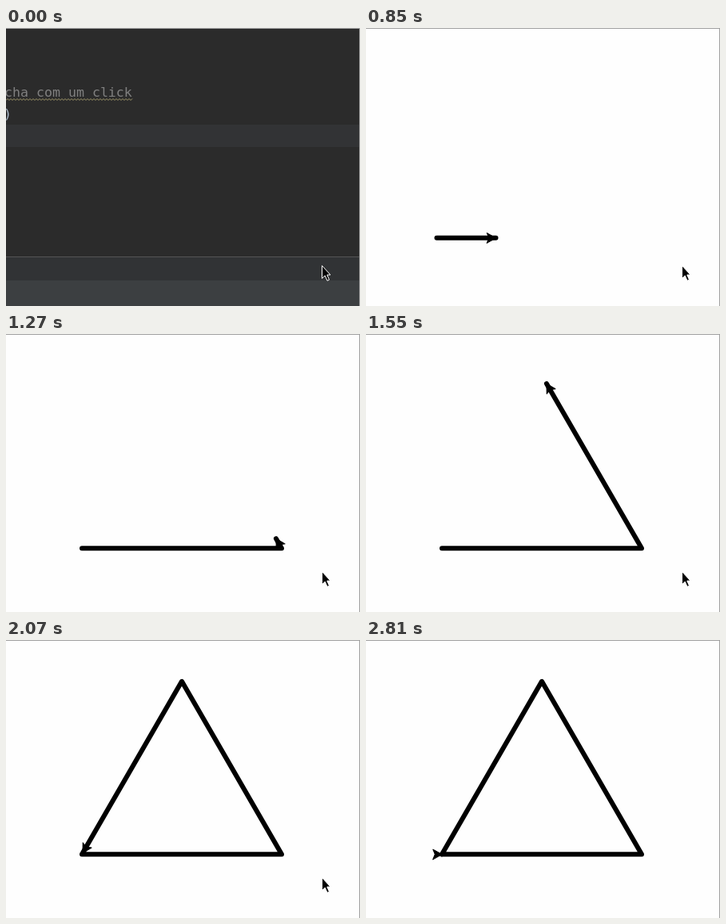
Recreate the animation shown at these times as an HTML page with a canvas. Size 443 px wide and 348 px high, loop 2960 ms.

```html
<!DOCTYPE html>
<html lang="pt">
<head>
<meta charset="utf-8">
<title>Triangle</title>
<style>
html, body { margin: 0; width: 100%; height: 100%; overflow: hidden; background: #2b2b2b; }
canvas { display: block; }
</style>
</head>
<body>
<canvas id="stage" width="443" height="348"></canvas>
<script>
const ctx = document.getElementById("stage").getContext("2d");
const LOOP = 2960, SIDE = 250, START = [95, 268.3];

// time, distance walked, heading in degrees
const WALK = [
  [850, 74, 0], [1000, 194, 0], [1130, 250, 66],
  [1270, 264, 120], [1400, 368, 120], [1550, 488, 120], [1670, 500, 140],
  [1810, 500, 238], [1950, 612, 240], [2070, 748, 240],
  [2210, 750, 310], [2330, 750, 360]
];

// time, pointer kind, x, y
const POINTER = [
  [0, "arrow", 395, 297], [450, "beam", 395, 297], [600, "arrow", 395, 297],
  [2330, "beam", 391, 298], [2450, "beam", 350, 298],
  [2570, "beam", 195, 295], [2690, "beam", 161, 259], [2810, "none", 0, 0]
];

const held = (keys, t) => keys.filter(k => k[0] <= t).pop();

function rect(color, x, y, w, h) {
  ctx.fillStyle = color;
  ctx.fillRect(x, y, w, h);
}

function polygon(points) {
  ctx.beginPath();
  points.forEach(([x, y]) => ctx.lineTo(x, y));
  ctx.closePath();
}

function drawEditor() {
  rect("#2b2b2b", 0, 0, 443, 348);
  rect("#323335", 0, 121, 442, 28);
  rect("#555555", 0, 286, 442, 1);
  rect("#313335", 0, 287, 442, 29);
  rect("#3c3f41", 0, 316, 442, 32);

  ctx.font = "16.6px 'DejaVu Sans Mono', monospace";
  ctx.fillStyle = "#808080";
  ctx.fillText("cha com um click", -2, 86);
  ctx.fillStyle = "#a9b7c6";
  ctx.fillText(")", -3, 113);

  ctx.beginPath();
  for (let x = 0; x <= 158; x += 2) ctx.lineTo(x, x % 4 ? 88.5 : 90.5);
  ctx.strokeStyle = "#a39a6c";
  ctx.lineWidth = 1;
  ctx.stroke();
}

function drawTurtle(x, y, heading) {
  ctx.save();
  ctx.translate(x, y);
  ctx.rotate(-heading * Math.PI / 180);
  ctx.scale(1.25, 1.25);
  polygon([[0, 0], [-9, -5], [-7, 0], [-9, 5]]);
  ctx.lineWidth = 0.8;
  ctx.fill();
  ctx.stroke();
  ctx.restore();
}

function drawTriangle(t) {
  const [, walked, heading] = held(WALK, t);
  rect("#fefefe", 0, 0, 443, 348);
  ctx.save();
  // the window settles after its first appearance
  if (t < 1000) ctx.translate(-6.5, -5.5);
  ctx.strokeStyle = ctx.fillStyle = "#000";
  ctx.lineWidth = 6;
  ctx.lineCap = ctx.lineJoin = "round";
  let [x, y] = START;
  ctx.beginPath();
  ctx.moveTo(x, y);
  for (let i = 0; i * SIDE < walked; i++) {
    const step = Math.min(SIDE, walked - i * SIDE);
    const angle = i * Math.PI * 2 / 3;
    x += step * Math.cos(angle);
    y -= step * Math.sin(angle);
    ctx.lineTo(x, y);
  }
  ctx.stroke();
  drawTurtle(x, y, heading);
  ctx.restore();
}

function drawArrow(x, y) {
  ctx.save();
  ctx.translate(x, y);
  polygon([[0.5, 0.5], [0.5, 16.5], [4.2, 13], [7, 19.3], [9.5, 18.2], [6.8, 12], [11, 12]]);
  ctx.fillStyle = "#000";
  ctx.strokeStyle = "#fff";
  ctx.lineWidth = 1;
  ctx.lineJoin = "miter";
  ctx.fill();
  ctx.stroke();
  ctx.restore();
}

function drawBeam(x, y, color) {
  for (const edge of [y - 8, y + 7]) {
    rect(color, x - 3, edge, 3, 1);
    rect(color, x + 1, edge, 3, 1);
  }
  rect(color, x, y - 7, 1, 14);
}

function draw(t) {
  const dark = t < 850;
  dark ? drawEditor() : drawTriangle(t);
  rect("#a0a0a0", 0, 0, 443, 1);
  rect("#a0a0a0", 442, 0, 1, 348);
  const [, kind, x, y] = held(POINTER, t);
  if (kind === "arrow") drawArrow(x, y);
  if (kind === "beam") drawBeam(x, y, dark ? "#d4d4d4" : "#222");
}

const begin = performance.now();
function tick() {
  draw((performance.now() - begin) % LOOP);
  requestAnimationFrame(tick);
}
tick();
</script>
</body>
</html>
```
